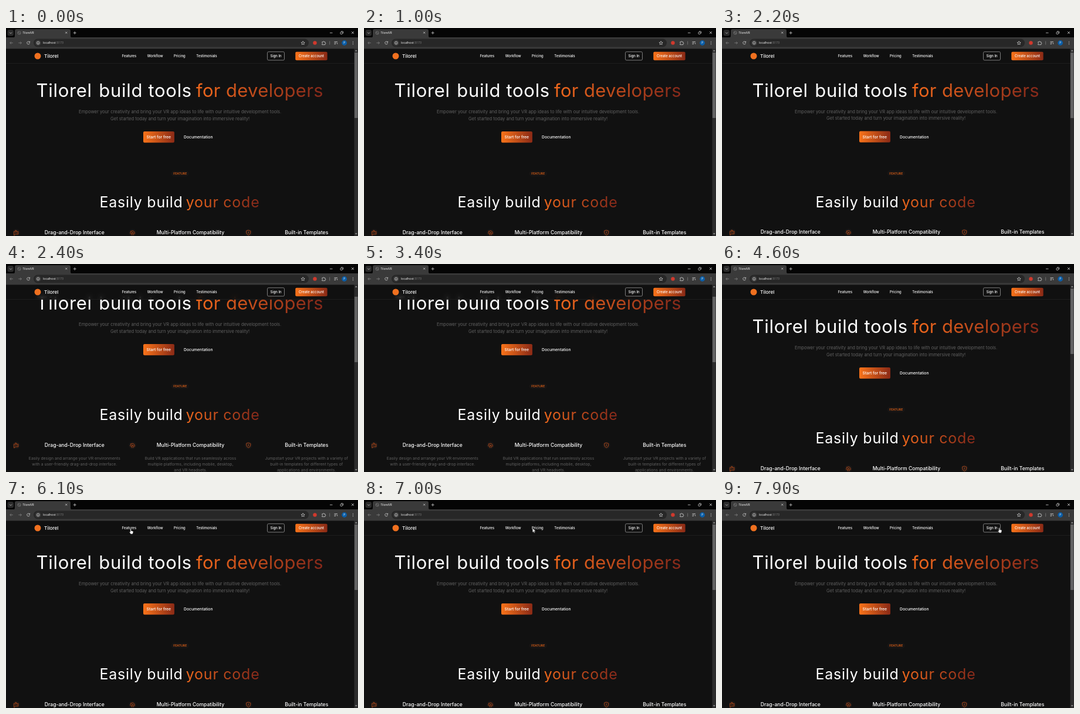
Write an HTML page that moves like this. It is 600 px wide and 356 px high and loops after 8000 ms.

```html
<!DOCTYPE html>
<html lang="en">
<head>
<meta charset="utf-8">
<title>TilorelVR</title>
<style>
  @property --scroll { syntax: '<number>'; inherits: true; initial-value: 0; }

  html, body { margin: 0; width: 100%; height: 100%; overflow: hidden; background: #111; }
  .stage {
    position: relative; width: 600px; height: 356px; overflow: hidden;
    font-family: Inter, sans-serif;
    animation: scroll 8s step-end infinite;
  }
  svg { position: absolute; left: 0; top: 0; display: block; fill: #fff; }
  .page { transform: translateY(calc(var(--scroll) * -1px)); }
  .thumb { transform: translateY(calc(var(--scroll) * .35px)); }
  .header {
    position: absolute; left: 0; top: 35px; width: 594px; height: 26px;
    background: rgba(17, 17, 17, .8); backdrop-filter: blur(4px);
    border-bottom: 1px solid #1e1e1e; box-sizing: border-box;
  }

  .hero { font-size: 31px; letter-spacing: .7px; }
  .hero .ember { letter-spacing: .35px; }
  .section { font-size: 25px; letter-spacing: .75px; }
  .ember { fill: url(#ember-text); }
  .lead { font-size: 7.62px; }
  .title { font-size: 8.6px; font-weight: 500; }
  .desc { font-size: 6.82px; }
  .lead, .desc { fill: #606060; }
  .mid, .lead, .title, .desc { text-anchor: middle; }
  .cta { font-size: 6.8px; font-weight: 500; }
  .badge { font-size: 5.2px; font-weight: 500; fill: #ea6416; }
  .nav { font-size: 5.9px; font-weight: 500; }
  .ui { font-family: 'Open Sans', sans-serif; font-size: 5.2px; }
  .ui.small { font-size: 4.7px; }
  .dim { stroke: #808080; }
  .line { fill: none; stroke: #d0d0d0; stroke-width: .8; }
  .icon { fill: none; stroke: #c4501a; stroke-width: .8; stroke-linecap: round; stroke-linejoin: round; }

  .cursor { animation: move 8s linear infinite; }
  .arrow { animation: arrow 8s step-end infinite; }
  .hand { animation: hand 8s step-end infinite; }

  @keyframes scroll {
    0% { --scroll: 0; }
    27.5% { --scroll: .5; }
    28.75% { --scroll: 24; }
    30% { --scroll: 40; }
    47.5% { --scroll: 14; }
    48.75% { --scroll: 2.5; }
    50% { --scroll: .8; }
    51.25%, 100% { --scroll: 0; }
  }
  @keyframes move {
    0%, 47.5% { transform: translate(82px, 104px); }
    48.75% { transform: translate(86px, 89px); }
    53%, 66.25% { transform: translate(76px, 68px); }
    76.25%, 78.75% { transform: translate(212px, 49px); }
    85%, 86.25% { transform: translate(257px, 48px); }
    88.75%, 91.25% { transform: translate(317px, 48px); }
    98.75%, 100% { transform: translate(472px, 47px); }
  }
  @keyframes arrow {
    0% { opacity: 0; }
    47.5% { opacity: 1; }
    57.5% { opacity: 0; }
    67.5% { opacity: 1; }
    75.2% { opacity: 0; }
    80.2% { opacity: 1; }
    82.8% { opacity: 0; }
    86.7% { opacity: 1; }
    91.6% { opacity: 0; }
    93.4% { opacity: 1; }
    97.5%, 100% { opacity: 0; }
  }
  @keyframes hand {
    0% { opacity: 0; }
    75.2% { opacity: 1; }
    80.2% { opacity: 0; }
    82.8% { opacity: 1; }
    86.7% { opacity: 0; }
    91.6% { opacity: 1; }
    93.4% { opacity: 0; }
    97.5%, 100% { opacity: 1; }
  }
</style>
</head>
<body>
<div class="stage">

  <svg class="page" width="600" height="420">
    <defs>
      <linearGradient id="ember"><stop stop-color="#f9731a"/><stop offset="1" stop-color="#8a2a16"/></linearGradient>
      <linearGradient id="ember-text"><stop stop-color="#f0681c"/><stop offset="1" stop-color="#84281a"/></linearGradient>
    </defs>

    <g class="hero">
      <text x="51.5" y="118">Tilorel</text>
      <text x="158.3" y="118">build tools</text>
      <text class="ember" x="324" y="118">for developers</text>
    </g>
    <g class="lead">
      <text x="296.7" y="146.2">Empower your creativity and bring your VR app ideas to life with our intuitive development tools.</text>
      <text x="296.7" y="157.6">Get started today and turn your imagination into immersive reality!</text>
    </g>

    <rect x="234" y="177" width="53" height="19.3" rx="2.2" fill="url(#ember)"/>
    <text class="cta mid" x="260.3" y="189">Start for free</text>
    <text class="cta mid" x="327.8" y="189">Documentation</text>

    <rect x="281.5" y="244.5" width="30.5" height="9.5" rx="4.7" fill="#171515"/>
    <text class="badge mid" x="296.7" y="251.3">FEATURE</text>
    <g class="section">
      <text x="159.5" y="307">Easily build</text>
      <text class="ember" x="306.8" y="307">your code</text>
    </g>

    <g fill="#191717">
      <circle cx="17.5" cy="350.3" r="6.3"/><circle cx="215.5" cy="350.3" r="6.3"/><circle cx="413.3" cy="350.3" r="6.3"/>
    </g>
    <g class="icon">
      <path d="M14 348.2h6.8v4.7h-4.6l-2.2 1.8zM17.4 348v-1.6h-1.6M16.2 350v.9M18.8 350v.9"/>
      <path d="M211.8 351.5a3.8 3.8 0 1 1 7.4 .6M213.4 353a2.3 2.3 0 1 1 4.4-1.5M215.5 350.5q.2 2-.8 3.8M217.6 352.4l-.6 1.8M212.5 347.8l1 .6"/>
      <path d="M413.3 346.2l3.5 1.2v2.6q0 3-3.5 4.5q-3.5-1.5-3.5-4.5v-2.6zM413.3 348.6v3"/>
    </g>
    <g class="title">
      <text x="116.8" y="352.6">Drag-and-Drop Interface</text>
      <text x="314.5" y="352.6">Multi-Platform Compatibility</text>
      <text x="512.2" y="352.6">Built-in Templates</text>
    </g>
    <g class="desc">
      <text x="116.8" y="375.3">Easily design and arrange your VR environments</text>
      <text x="116.8" y="384.9">with a user-friendly drag-and-drop interface.</text>
      <text x="314.5" y="375.3">Build VR applications that run seamlessly across</text>
      <text x="314.5" y="384.9">multiple platforms, including mobile, desktop,</text>
      <text x="314.5" y="394.5">and VR headsets.</text>
      <text x="512.2" y="375.3">Jumpstart your VR projects with a variety of</text>
      <text x="512.2" y="384.9">built-in templates for different types of</text>
      <text x="512.2" y="394.5">applications and environments.</text>
    </g>
  </svg>

  <div class="header"></div>

  <svg width="600" height="356">
    <!-- site navigation -->
    <circle cx="54" cy="48" r="5.5" fill="#f0701f"/>
    <text x="65" y="50.8" font-size="8.2" font-weight="500">Tilorel</text>
    <g class="nav mid">
      <text x="210" y="50.1">Features</text>
      <text x="254.2" y="50.1">Workflow</text>
      <text x="295.8" y="50.1">Pricing</text>
      <text x="342" y="50.1">Testimonials</text>
      <rect x="445.5" y="40.7" width="29" height="14.4" rx="2" fill="none" stroke="#999" stroke-width=".8"/>
      <text x="460" y="50.1">Sign In</text>
      <rect x="493.3" y="40.8" width="54.4" height="14.4" rx="2" fill="url(#ember)"/>
      <text x="520.5" y="50.1">Create account</text>
    </g>

    <!-- scrollbar -->
    <rect x="593.5" y="35" width="6.5" height="321" fill="#2c2c2c"/>
    <rect class="thumb" x="594" y="42" width="5.5" height="112" fill="#636363"/>
    <path d="M594.8 39.8l2-2.4 2 2.4zM594.8 351.2l2 2.4 2-2.4z" fill="#999"/>

    <!-- browser frame -->
    <rect width="600" height="17" fill="#050505"/>
    <rect y="16" width="600" height="19.5" fill="#3a3a3a"/>
    <path d="M12 16.5q3 0 3-3V5q0-3 3-3h89q3 0 3 3v8.5q0 3 3 3z" fill="#3a3a3a"/>
    <rect x="2.5" y="3" width="10.5" height="10.5" rx="3" fill="#2b2b2b"/>
    <g class="line">
      <path d="M6 7.5l2 2 2-2"/>
      <path d="M101.2 6.5l3 3m0-3l-3 3"/>
      <path d="M114.7 8.3h5m-2.5-2.5v5"/>
      <path d="M552 8.3h4.500M589 6l4 4m0-4l-4 4"/>
      <rect x="570" y="7" width="3.400" height="3.400" rx=".8"/>
      <path d="M571.200 5.700h2.400q1.200 0 1.200 1.200v2.400"/>
      <circle class="dim" cx="22.5" cy="8.3" r="2.6"/>
      <path class="dim" d="M20.5 7l4 2.8"/>
    </g>
    <text class="ui small" x="28.5" y="10.1">TilorelVR</text>

    <rect x="47" y="18.5" width="469" height="14" rx="7" fill="#272727"/>
    <circle cx="54.8" cy="25.5" r="5" fill="#3a3a3a"/>
    <g class="line">
      <path class="dim" d="M11.8 25.5h-5m2.2-2.2l-2.2 2.2 2.2 2.2"/>
      <path class="dim" d="M21.4 25.5h5m-2.2-2.2l2.2 2.2-2.2 2.2"/>
      <path d="M40.2 24.3a2.4 2.4 0 1 0 .2 1.8M40.6 22.7v1.9h-1.9"/>
      <circle cx="54.8" cy="25.5" r="2.4"/>
      <path d="M54.8 25v1.8M54.8 23.9v.4"/>
      <path d="M506.2 22.6l.9 1.9 2.1.3-1.5 1.5.4 2-1.9-1-1.9 1 .4-2-1.5-1.5 2.1-.3z"/>
      <path d="M538.8 23.8h1.5a1 1 0 0 1 2 0h1.6v1.5a1 1 0 0 1 0 2v1.3h-5.1v-1.5a1 1 0 0 0 0-1.9z"/>
      <path class="dim" d="M551.7 22.5v6"/>
      <path d="M559.5 23.5h5.5M559.5 25.5h3.5M559.5 27.5h2.5M564.7 25v2.6"/>
    </g>
    <circle cx="526.5" cy="25.5" r="3.2" fill="#d0392d"/>
    <circle cx="576.7" cy="25.5" r="4.4" fill="#0b5ea8"/>
    <text class="ui small mid" x="576.7" y="27.1">P</text>
    <g fill="#d0d0d0">
      <circle cx="591.5" cy="23.3" r=".6"/><circle cx="591.5" cy="25.5" r=".6"/><circle cx="591.5" cy="27.7" r=".6"/>
    </g>
    <text class="ui" x="63" y="27.3">localhost<tspan fill="#8a8a8a">:5173</tspan></text>

    <!-- pointer -->
    <g class="cursor" stroke="#111" stroke-width=".4" stroke-linejoin="round">
      <path class="arrow" d="M0 0v7.4l1.7-1.5 1.2 2.6 1.2-.5-1.2-2.6h2.3z"/>
      <path class="hand" d="M-.2 .7q.7-1 1.4 0v3l2.9.6q.9.2.8 1.1l-.5 2.3-.7 1.5h-3l-2.4-3q-.2-.9.6-.8l.9.8z"/>
    </g>
  </svg>
</div>
</body>
</html>
```
